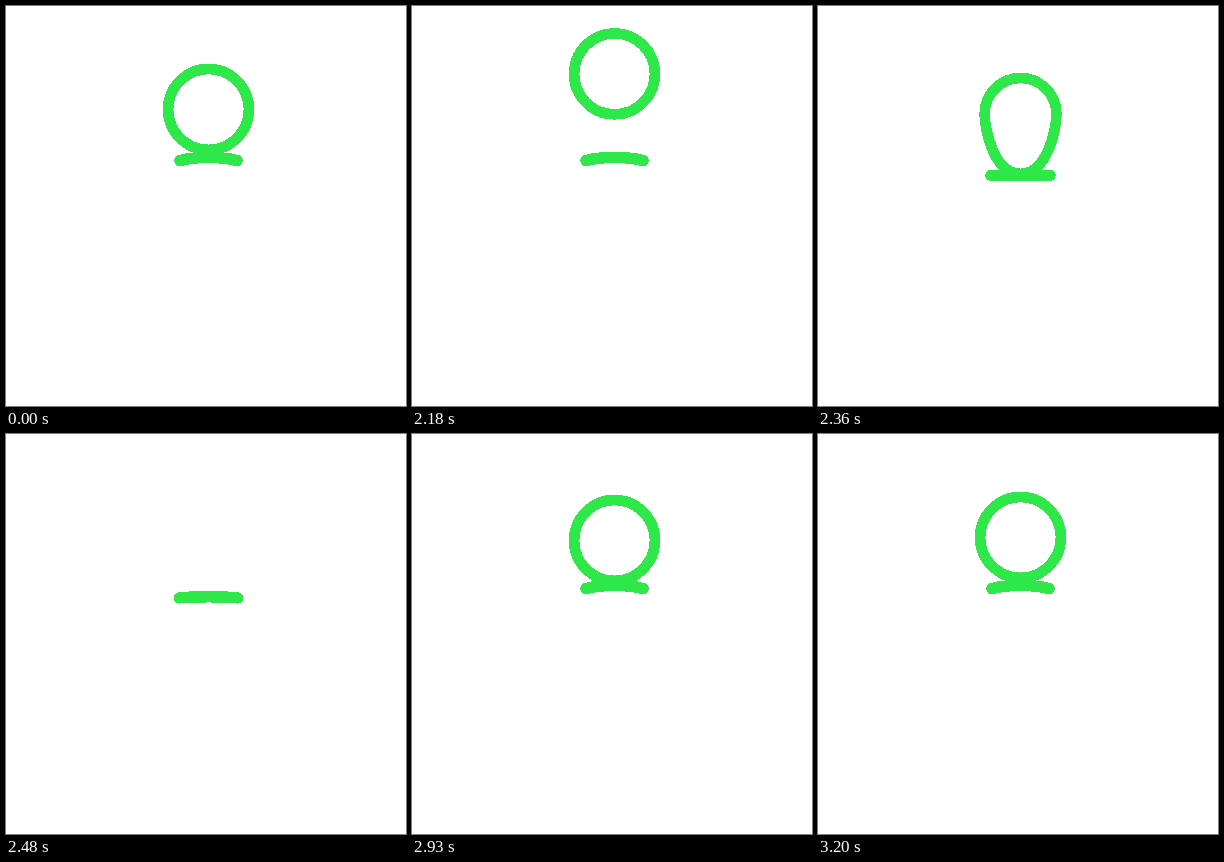
Write an HTML page that moves like this. It is 400 px wide and 400 px high and loops after 3.29 s.

```html
<!DOCTYPE html>
<html lang="en">
<head>
<meta charset="utf-8">
<title>Coin drop</title>
<style>
  html, body { margin: 0; width: 100%; height: 100%; overflow: hidden; background: #fff; }
  svg { display: block; width: 100vw; height: 100vh; }
  path { fill: none; stroke: #2ee84a; stroke-linecap: round; shape-rendering: crispEdges; }
</style>
</head>
<body>
<svg viewBox="0 0 400 400">
  <clipPath id="above"><rect id="mask" width="400" height="151.5"/></clipPath>
  <g clip-path="url(#above)"><path id="coin" stroke-width="10.6"/></g>
  <path id="slot" stroke-width="11.4"/>
</svg>
<script>
const LOOP = 3290, STEP = 30, START = 2030;
const APEX = 2180, RETURN = 2840, PEAK = 3020, FLIGHT = 180;
const CX = 202.5, R = 40.4, K = 0.552;
const el = id => document.getElementById(id);
const coin = el('coin'), slot = el('slot'), mask = el('mask');

const clamp = (v, lo = 0, hi = 1) => Math.min(hi, Math.max(lo, v));
const smooth = p => p * p * (3 - 2 * p);
const half = (t, from, length) => Math.sin(Math.PI * clamp((t - from) / length));

// Tossed up, then pulled through the slot
function drop(t) {
  const s = Math.max(-1, (t - APEX) / FLIGHT);
  const squeeze = s > 0 ? clamp(s ** 6) : 0;
  const pull = s < 0 ? 35.5 : 59.5;
  return { top: 27.5 + pull * s * s - 15 * squeeze, squeeze };
}

// Shoots out of the slot, overshoots and settles
function comeBack(t) {
  const u = Math.max(0, 2 * (PEAK - t) / FLIGHT);
  const settle = smooth(clamp((t - PEAK) / FLIGHT));
  return { top: 45 + 21 * u ** 2.5 + 18 * settle, squeeze: clamp(u - 1) };
}

function coinPath({ top, squeeze }) {
  const w = R - 4.5 * squeeze;
  const mid = top + w;
  const bottom = top + 2 * R + 15 * squeeze;
  const shoulder = mid - K * w;
  const waist = mid + (K - 0.3 * squeeze) * (bottom - mid);
  const base = (K + 0.2 * squeeze) * w;
  return `M${CX} ${top}
    C${CX - K * w} ${top} ${CX - w} ${shoulder} ${CX - w} ${mid}
    C${CX - w} ${waist} ${CX - base} ${bottom} ${CX} ${bottom}
    C${CX + base} ${bottom} ${CX + w} ${waist} ${CX + w} ${mid}
    C${CX + w} ${shoulder} ${CX + K * w} ${top} ${CX} ${top}Z`;
}

// A bar pushed down by the coin, springing back past its rest
function bar(t) {
  const dip = 34 * half(t, 2303, 220) ** 2;
  return {
    mid: 151.5 + dip - 4 * half(t, 2523, 137),
    end: 154.5 + 0.83 * dip,
    reach: 28.5 + clamp(dip / 18),
  };
}

function barPath({ mid, end, reach }) {
  const bend = (4 * mid - end) / 3;
  return `M${CX - reach} ${end}C${CX - reach / 2} ${bend} ${CX + reach / 2} ${bend} ${CX + reach} ${end}`;
}

function draw(now) {
  const time = now % LOOP;
  // the motion advances in fixed steps
  const t = time < START ? 0 : START + Math.floor((time - START) / STEP) * STEP;
  const shape = bar(t);
  coin.setAttribute('d', coinPath(t < RETURN ? drop(t) : comeBack(t)));
  slot.setAttribute('d', barPath(shape));
  mask.setAttribute('height', shape.mid);
}

const begin = performance.now();
function tick() {
  draw(performance.now() - begin);
  requestAnimationFrame(tick);
}
tick();
</script>
</body>
</html>
```
